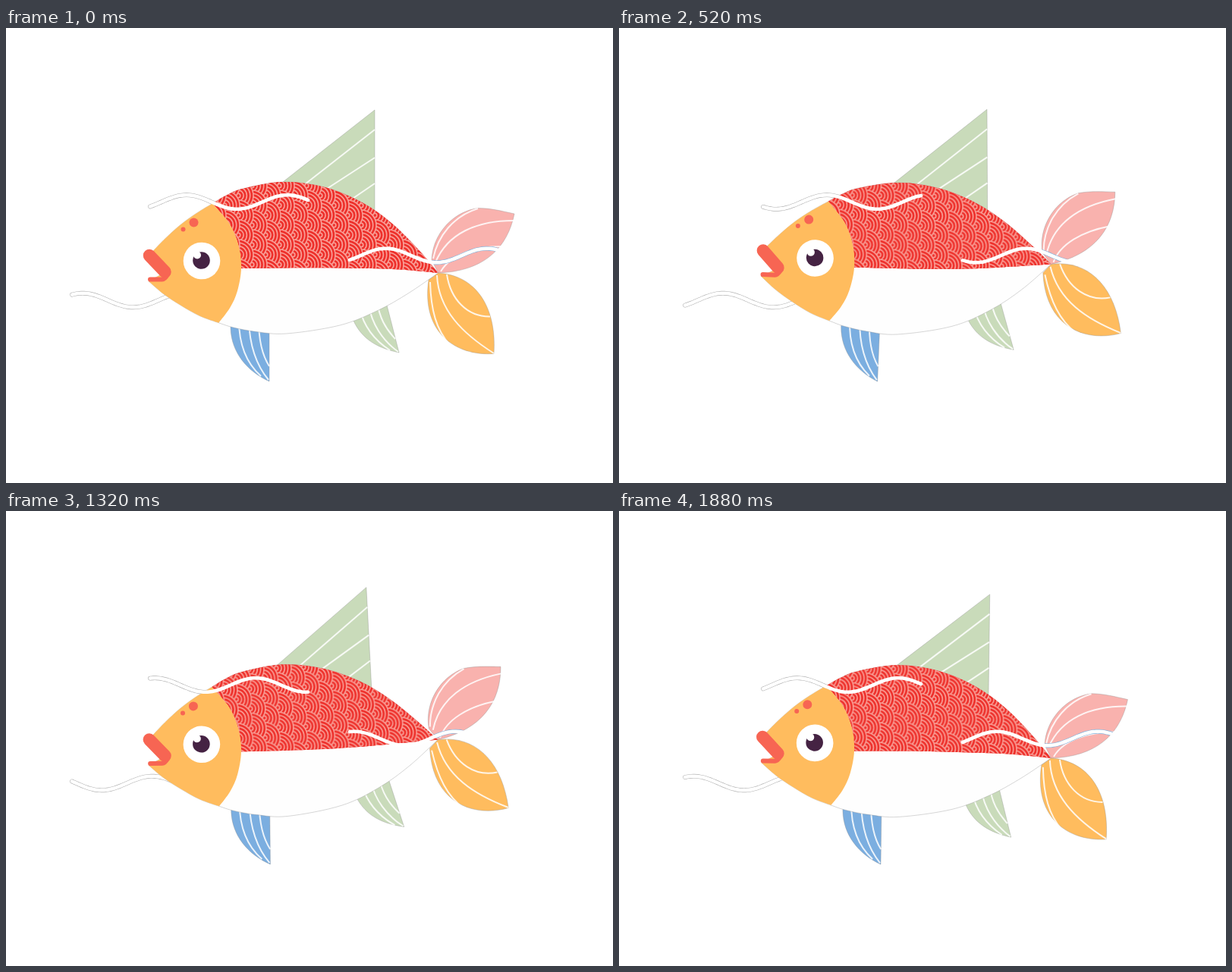
An HTML page that plays this animation: 800x600 px, repeating every 1.92 s.

```html
<!DOCTYPE html>
<html lang="en">
<head>
<meta charset="utf-8">
<title>Swimming fish</title>
<style>
  html, body { margin: 0; width: 100%; height: 100%; overflow: hidden; background: #fff; }
  svg { display: block; width: 100vw; height: 100vh; }
  .rays { fill: none; stroke: #fff; stroke-width: 2; stroke-opacity: .85; }
  .edge { stroke: #8c8c8c; stroke-width: .6; stroke-opacity: .6; }
  .whisker { fill: none; stroke: #fff; stroke-width: 4.6; stroke-linecap: round; }
  .rim { fill: none; stroke: #b4b4b4; stroke-width: 5.8; stroke-linecap: round; }
</style>
</head>
<body>
<svg viewBox="0 0 800 600">
  <defs>
    <pattern id="scales" width="36" height="26" patternUnits="userSpaceOnUse"></pattern>
    <clipPath id="pinkClip"><use href="#pinkFin"/></clipPath>
  </defs>

  <path id="chinRim" class="rim"/>
  <path id="chin" class="whisker"/>
  <path id="browRim" class="rim"/>

  <g id="tail">
    <path id="pinkFin" class="edge" fill="#f9b2ae" d="M569.5 323C630 321 661 290 670 245C652 241 638 237.500 622 237.500C589 242 562 272 561 306Z"/>
    <path class="rays" d="M563 304C569 274 590 248 622 238M566 309C582 271 620 254 669 254M573 321C586 299 618 288 654 288"/>
    <path class="edge" fill="#ffbc5e" d="M569.500 323C618 326 647 366 643 429.500C592 433 547 401 557 332Z"/>
    <path class="rays" d="M581 325C586 358 608 381 638 380.500M568 326C570 372 602 403 643 429M559 335C560 372 567 398 585 418"/>
    <g clip-path="url(#pinkClip)"><path id="tailRim" class="rim" style="stroke:#7fb2dc"/></g>
  </g>

  <g id="dorsal">
    <path class="edge" fill="#c9dbba" d="M340 222.600L486 108V246Z"/>
    <path class="rays" d="M385 213L486 134M412 219L486 171M445 233L486 205"/>
  </g>
  <g id="pelvic">
    <path class="edge" fill="#7baee0" d="M296 380V396C297 428 318 453 347 466V380Z"/>
    <path class="rays" d="M307 385C307 420 319 444 336 459M320 385C321 420 331 446 346 464M333 385C333 412 338 432 347 446"/>
  </g>
  <g id="anal">
    <path class="edge" fill="#c9dbba" d="M450 370L458 386C469 410 489 422 518 428L498 350Z"/>
    <path class="rays" d="M466 370C472 395 486 412 506 425M478 365C482 390 496 412 517 427M489 360C492 382 500 396 513 410"/>
  </g>

  <path id="silhouette" class="edge" fill="#fefefe"/>
  <path id="back" fill="#ee302b"/>
  <path id="backScales" fill="url(#scales)"/>
  <path id="face" fill="#ffbc5e"/>

  <g id="head">
    <path fill="none" stroke="#f76553" stroke-linecap="round" stroke-width="16.500" d="M189 300L209.500 321.500"/>
    <path fill="#f76553" d="M190 328.500H206L216 326Q211 334.500 206 334.500H190Q187 334.500 187 331.500Q187 328.500 190 328.500Z"/>
    <circle cx="247.500" cy="256.500" r="6" fill="#f76553"/>
    <circle cx="233.500" cy="265.500" r="3" fill="#f76553"/>
    <circle cx="258" cy="307" r="24.300" fill="#fff"/>
    <circle cx="257.500" cy="306.500" r="11.300" fill="#452343"/>
    <circle cx="252" cy="299.500" r="5" fill="#fff"/>
  </g>

  <path id="brow" class="whisker"/>
  <path id="side" class="whisker"/>
</svg>
<script>
const LOOP = 1920, SWIM = 960, STEP = 40;
const PIVOT = { x: 340, y: 318 }, TAIL = { x: 569.5, y: 323 };
const $ = id => document.getElementById(id);
const set = (id, name, value) => $(id).setAttribute(name, value);
const wave = (t, delay) => Math.sin(2 * Math.PI * (t - delay) / SWIM);

// Outlines at t = 0, bent by the swimming motion afterwards.
const topHead = [[193, 295], [210, 277.5], [230, 259.500], [250, 245], [272, 231.5]];
const topBack = [[272, 231.5], [290, 221], [312, 212], [365, 203], [420, 210], [470, 230.5], [510, 259], [545, 294], [569.5, 323]];
const belly = [[569.5, 323], [530, 350], [490, 372.5], [440, 392], [370, 403], [330, 400.5], [300, 395], [281, 389]];
const chinLine = [[281, 389], [255, 379.5], [230, 365.5], [208, 351], [188, 334]];
const middle = [[569.5, 323], [520, 318.5], [470, 317], [400, 316.2], [310, 317]];
const mouth = [[210, 322]];

// The gill cover is an arc of a circle.
const gill = [231.5, 258, 287, 317, 347, 369, 389].map(y => [201 + Math.sqrt(109 ** 2 - (y - 314) ** 2), y]);

// Columns of overlapping ringed discs, those nearer the head on top.
function buildScales() {
  let discs = '';
  for (let col = 4; col >= -2; col--) {
    for (let row = -1; row <= 2; row++) {
      const x = col * 18, y = row * 26 + (col & 1 ? 13 : 0);
      for (let r = 20; r > 2; r -= 4.3) {
        discs += `<circle cx="${x}" cy="${y}" r="${r}" fill="#ee302b" stroke="#f9a098" stroke-width="1.6"/>`;
      }
    }
  }
  $('scales').innerHTML = discs;
}

// Degrees turned since t = 0; the wave reaches the tail later than the head.
const turn = (t, delay, size = 3) => -size * (wave(t, delay) - wave(0, delay));

function bend([x, y], t) {
  const u = Math.max(0, x - PIVOT.x);
  const delay = -45 + 0.382 * u + 0.00079 * u * u;
  const size = 3 * (1 + 0.18 * (u / 229) ** 3);
  const a = turn(t, delay, size) * Math.PI / 180;
  const dx = x - PIVOT.x, dy = y - PIVOT.y;
  return [PIVOT.x + dx * Math.cos(a) - dy * Math.sin(a), PIVOT.y + dx * Math.sin(a) + dy * Math.cos(a)];
}

// Smooth curve segments through the points, starting with a line to the first.
function curve(points) {
  let d = 'L' + points[0].map(n => n.toFixed(2));
  for (let i = 0; i < points.length - 1; i++) {
    const p = points[i], q = points[i + 1];
    const before = points[i - 1] || p, after = points[i + 2] || q;
    const c1 = p.map((n, k) => n + (q[k] - before[k]) / 6);
    const c2 = q.map((n, k) => n - (after[k] - p[k]) / 6);
    d += 'C' + [...c1, ...c2, ...q].map(n => n.toFixed(2));
  }
  return d;
}

const shape = (t, ...lines) =>
  'M' + lines.map(line => curve(line.map(p => bend(p, t)))).join('').slice(1) + 'Z';

function whisker(t, x0, x1, y, peak) {
  const points = [];
  for (let x = x0; x <= x1; x += 4) {
    const phase = 2 * Math.PI * ((t - peak) / LOOP - (x - x0) / 133);
    points.push([x, y + 9.3 * Math.cos(phase)]);
  }
  return 'M' + curve(points).slice(1);
}

const rotate = (id, t, delay) =>
  set(id, 'transform', `rotate(${turn(t, delay)} ${PIVOT.x} ${PIVOT.y})`);

function draw(t) {
  rotate('head', t, -45);
  rotate('pelvic', t, -45);
  rotate('dorsal', t, 27);
  rotate('anal', t, 50);
  set('scales', 'patternTransform', `rotate(${turn(t, 0)} ${PIVOT.x} ${PIVOT.y})`);

  const [tx, ty] = bend([TAIL.x, TAIL.y], t);
  const swing = turn(t, 180, 6.2);
  set('tail', 'transform', `translate(${tx} ${ty}) rotate(${swing}) translate(${-TAIL.x} ${-TAIL.y})`);
  // Keeps the whisker's rim level inside the swinging tail.
  set('tailRim', 'transform', `translate(${TAIL.x} ${TAIL.y}) rotate(${-swing}) translate(${-tx} ${-ty})`);

  const back = shape(t, topBack, middle, gill.slice(0, 4).reverse());
  set('silhouette', 'd', shape(t, [...topHead, ...topBack.slice(1)], [...belly, ...chinLine.slice(1)], mouth));
  set('back', 'd', back);
  set('backScales', 'd', back);
  set('face', 'd', shape(t, topHead, gill, chinLine, mouth));

  const chin = whisker(t, 87, 290, 359, 757);
  const brow = whisker(t, 190, 399, 229.5, 270);
  const side = whisker(t, 453, 655, 300, 270);
  set('chin', 'd', chin);
  set('chinRim', 'd', chin);
  set('brow', 'd', brow);
  set('browRim', 'd', brow);
  set('side', 'd', side);
  set('tailRim', 'd', side);
}

buildScales();
const start = performance.now();
function frame() {
  const elapsed = (performance.now() - start) % LOOP;
  draw(Math.floor(elapsed / STEP) * STEP);
  requestAnimationFrame(frame);
}
frame();
</script>
</body>
</html>
```
